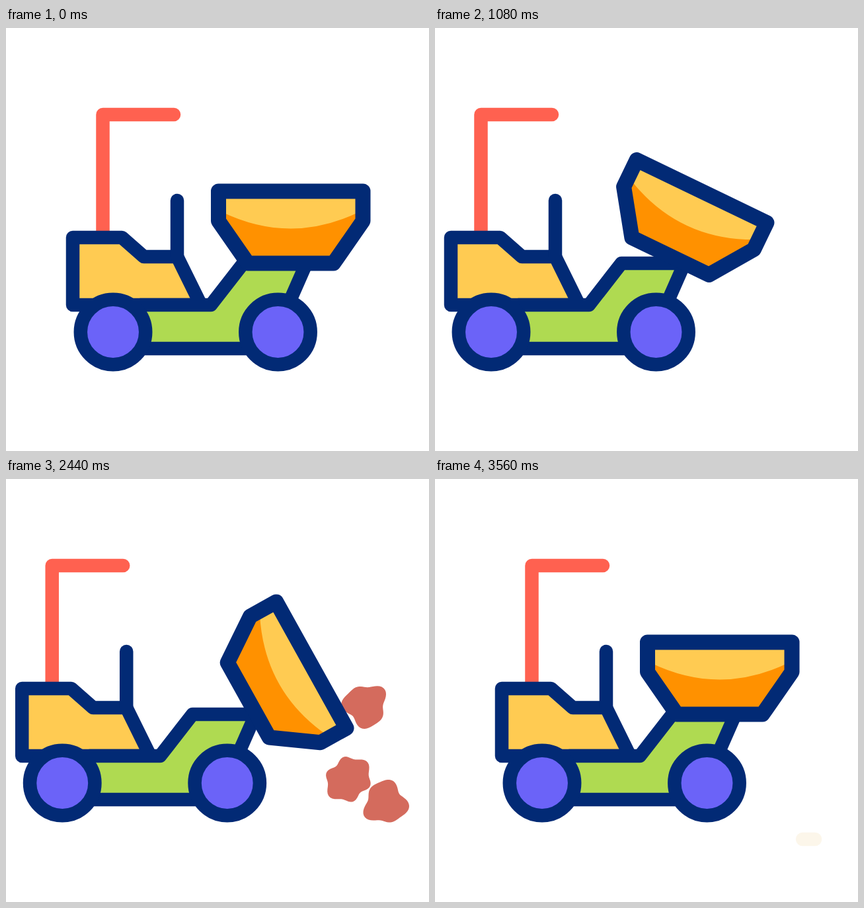
An HTML page for the animation above (3.6 s loop, 640 by 640 pixels).

```html
<!DOCTYPE html>
<html lang="en">
<head>
<meta charset="utf-8">
<title>Dumper</title>
<style>
  html, body { margin: 0; width: 100%; height: 100%; overflow: hidden; background: #fff; }
  svg { display: block; width: 100vw; height: 100vh; }
  .line { fill: none; stroke: #022a75; stroke-width: 20.5; stroke-linecap: round; stroke-linejoin: round; }
  .red { stroke: #ff6150; }
  .yellow { fill: #ffcb52; }
  .green { fill: #afda51; }
  .orange { fill: #ff9100; }
  .thick { stroke-width: 23; }
  .wheel { fill: #6b63f8; }
  .rock { fill: #d46b5d; }
</style>
</head>
<body>
<svg viewBox="0 0 640 640">
  <path id="dash" class="line"/>
  <g id="rocks"></g>
  <g id="truck">
    <g id="body">
      <path class="line red" d="M146.5 312V131H254"/>
      <path class="line yellow" d="M101 317H175.5L208.5 346H259L295 419H101Z"/>
      <path class="line" d="M259 261V346"/>
    </g>
    <g id="chassis">
      <path class="green" d="M203 419H310L359 356H454.5L411 455V485H190Z"/>
      <path class="line" d="M203 419H310L359 356H454.5L411 455M185 485H400"/>
    </g>
    <circle class="line wheel" cx="162" cy="460" r="49.2"/>
    <circle class="line wheel" cx="411.5" cy="460" r="49.2"/>
    <g id="bucket">
      <path class="yellow" d="M321.5 247H540V292L495.5 356H366L321.5 292Z"/>
      <path class="orange" d="M326 278Q431 329 535 278L540 292L495.5 356H366L321.5 292Z"/>
      <path class="line thick" d="M321.5 247H540V292L495.5 356H366L321.5 292Z"/>
    </g>
  </g>
</svg>
<script>
const LOOP = 3600, HOLD = 3560;
const $ = id => document.getElementById(id);
const set = (el, name, value) => el.setAttribute(name, value);
const mix = (a, b, k) => a + (b - a) * k;

// Eased progress between two times, and a rise followed by a fall
const ease = (t, from, to) => {
  const k = Math.min(1, Math.max(0, (t - from) / (to - from)));
  return k * k * (3 - 2 * k);
};
const bump = (t, from, peak, to) => ease(t, from, peak) - ease(t, peak, to);
const wave = (deg, n, phase) => Math.cos(n * (deg - phase) * Math.PI / 180);

// Outline of a lumpy rock, its radius given for each angle
function outline(radius) {
  let d = "";
  for (let a = 0; a < 360; a += 5) {
    const r = radius(a);
    d += `${a ? "L" : "M"}${r * wave(a, 1, 0)} ${r * wave(a, 1, 90)}`;
  }
  return d + "Z";
}

// Rocks of one kind land at (x, y) one after another
const kinds = [
  { radius: a => 31.5 + 2.5 * wave(a, 5, 4) + 4 * wave(a, 3, 25),
    x: 574, y: 490, flight: 558, spin: 328, first: 2147, gap: 293, count: 3 },
  { radius: a => 33 + 3 * wave(a, 2, 128) + 3 * wave(a, 6, 128),
    x: 518, y: 478, flight: 440, spin: 125, first: 2475, gap: 347, count: 2 }
];

const rocks = kinds.flatMap(kind => Array.from({ length: kind.count }, (_, i) => {
  const el = document.createElementNS("http://www.w3.org/2000/svg", "path");
  set(el, "class", "rock");
  set(el, "d", outline(kind.radius));
  $("rocks").append(el);
  return { ...kind, el, land: kind.first + i * kind.gap };
}));

// Fly out from behind the bucket, land, then roll away faster and faster
function drawRock({ el, x, y, flight, spin, land }, t) {
  const k = Math.min(1, (t - land) / flight + 1);
  set(el, "visibility", k > 0 ? "visible" : "hidden");
  if (k <= 0) return;
  const roll = 116 * (Math.max(0, t - land) / 300) ** 1.5;
  const px = mix(400, x, 1 - (1 - k) ** 2.7) + roll;
  const py = mix(270, y, k ** 1.5);
  set(el, "transform", `translate(${px} ${py}) rotate(${spin * (1 - k)})`);
}

function drawDash(t) {
  const on = t > 2700;
  set($("dash"), "visibility", on ? "visible" : "hidden");
  if (!on) return;
  const head = mix(30, 575, ease(t, 2700, 3560));
  const tail = mix(30, 575, ease(t, 2860, 3648));
  const fade = ease(t, 2880, 3560);
  const rgb = [[212, 252], [107, 246], [93, 234]].map(([a, b]) => Math.round(mix(a, b, fade)));
  set($("dash"), "d", `M${tail} 545H${head + 0.01}`);
  $("dash").style.stroke = `rgb(${rgb})`;
}

function draw(t) {
  const x = 77 * (ease(t, 2410, 3410) - ease(t, 0, 1025));
  set($("truck"), "transform", `translate(${x} 0)`);

  const sway = bump(t, 220, 780, 1060);
  const bodyY = -9.2 * bump(t, 0, 545, 930);
  const lean = 1.65 * bump(t, 0, 545, 1000);
  set($("body"), "transform", `translate(${-2.3 * sway} ${bodyY}) rotate(${lean} 200 270)`);

  const lift = `translate(0 ${-10.3 * bump(t, 0, 530, 1060)}) rotate(${-sway} 310 425)`;
  const tilt = 61 * (ease(t, 850, 1366) - ease(t, 2430, 2924));
  set($("chassis"), "transform", lift);
  set($("bucket"), "transform", `${lift} rotate(${tilt} 455.5 356)`);

  rocks.forEach(rock => drawRock(rock, t));
  drawDash(t);
}

const start = performance.now();
function tick() {
  draw(Math.min((performance.now() - start) % LOOP, HOLD));
  requestAnimationFrame(tick);
}
draw(0);
requestAnimationFrame(tick);
</script>
</body>
</html>
```
